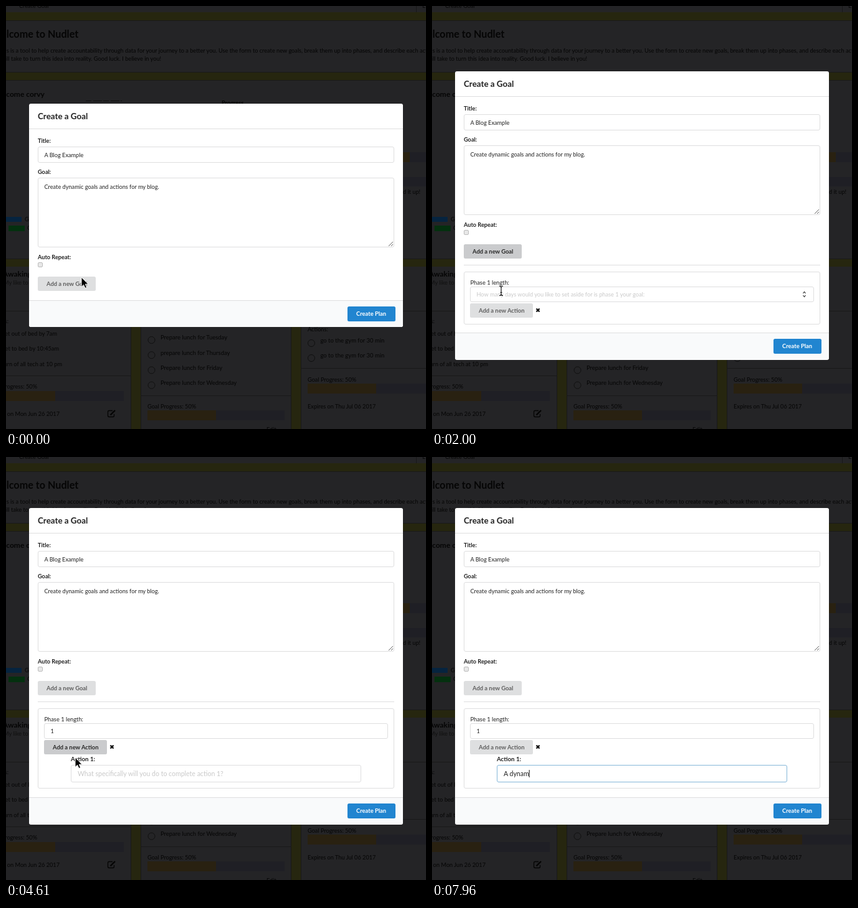
Animation, 674 px wide and 680 px high, one loop 8000 ms. Source, as an HTML page:

```html
<!DOCTYPE html>
<html lang="en">
<head>
<meta charset="utf-8">
<title>Create a Goal</title>
<style>
  html, body { margin: 0; width: 100%; height: 100%; overflow: hidden; background: #242426; }
  svg { display: block; width: 674px; height: 680px; }
  text { font-family: Lato, "Open Sans", sans-serif; white-space: pre; }
</style>
</head>
<body>
<svg id="stage" viewBox="0 0 674 680" xmlns="http://www.w3.org/2000/svg"></svg>
<script>
const LOOP = 8000;
const INK = '#212121', EDGE = '#dededf', FOCUS = '#85b7d9';
const PALE = '#c9c9c9', DIM = '#858585';
const BODY = 9.2, INPUT = 10.55;

// Text is placed by its left edge and its vertical centre.
const text = (x, cy, size, str, { bold, fill = INK, id, anchor } = {}) =>
  `<text x="${x}" y="${(cy + size * 0.36).toFixed(2)}" font-size="${size}" fill="${fill}"` +
  (bold ? ' font-weight="700"' : '') + (id ? ` id="${id}"` : '') +
  (anchor ? ` text-anchor="${anchor}"` : '') + `>${str}</text>`;

const rect = (x, y, w, h, fill, extra = '') =>
  `<rect x="${x}" y="${y}" width="${w}" height="${h}" fill="${fill}" ${extra}/>`;

const box = (x, y, w, h, id = '') =>
  rect(x + .5, y + .5, w - 1, h - 1, '#fff', `rx="2.5" stroke="${EDGE}"` + (id && ` id="${id}"`));

const path = (d, stroke, width = 1, extra = '') =>
  `<path d="${d}" fill="none" stroke="${stroke}" stroke-width="${width}" ${extra}/>`;

function pageMarkup() {
  const dark = '#050505', soft = '#101010', line = '#191919';
  const gap = '#26260f', track = '#1f1f25', done = '#292111';
  const t = (x, cy, str, o = {}) => text(x, cy, o.size || BODY, str, { fill: dark, ...o });
  const bar = (x, y, w, part) => rect(x, y, w, 16, track) + rect(x, y, part, 16, done);
  const todo = (x, cy, str) =>
    `<circle cx="${x}" cy="${cy + 4}" r="5.5" fill="none" stroke="${soft}"/>` +
    t(x + 14.5, cy, str, { size: 9.46 });
  const lunch = ['Prepare lunch for Tuesday', 'prepare lunch for Thursday',
    'Prepare lunch for Friday', 'Prepare lunch for Wednesday'];
  return [
    rect(0, 10, 674, 13, gap), rect(0, 107, 674, 12, gap), rect(0, 407, 674, 12, gap),
    rect(201, 490, 15, 190, gap), rect(458, 490, 15, 190, gap),
    path('M0 23.5H674M0 106.5H674M0 119.5H674M0 406.5H674M658.5 0V10', line),
    t(21, 0, 'Create Goal'), t(668, 0, 'E'),
    t(-24, 45, 'Welcome to Nudlet', { size: 16.2, bold: true }),
    t(-12, 72, 'This is a tool to help create accountability through data for your journey to a better you. ' +
      'Use the form to create new goals, break them up into phases, and describe each action'),
    t(249, 85, 'it will take to turn this idea into reality. Good luck. I believe in you!', { anchor: 'end' }),
    t(-21, 142, 'Welcome corvy', { size: 12, bold: true }),
    t(346, 156, 'Progress', { bold: true }),
    path('M128 152.5H186', soft, 1, 'stroke-dasharray="9 3 14 2"'),
    bar(637, 235, 37, 11), rect(637, 275, 37, 15, track),
    t(665, 299, 'Speed it up!', { anchor: 'end' }),
    rect(0, 339, 25, 8, '#06243f'), rect(4, 353, 26, 9, '#04300f'),
    t(30, 343, 'Goals'), t(34, 357, 'Goals'),
    t(-5, 431, 'Awaking early', { size: 12, bold: true }), t(-4, 445, 'My like to get up', { fill: soft }),
    // left card
    path('M0 490.5H200.5V680M0 594.5H200', line),
    t(4, 507, 'Actions:', { anchor: 'end' }),
    t(82, 527, 'get out of bed by 7am', { anchor: 'end' }),
    t(85, 551, 'get to bed by 10:45am', { anchor: 'end' }),
    t(90, 576, 'turn of all tech at 10 pm', { anchor: 'end' }),
    t(50, 612, 'Goal Progress: 50%', { anchor: 'end' }), bar(0, 619, 189, 79),
    t(86, 656, 'Expires on Mon Jun 26 2017', { anchor: 'end' }),
    path('M171 650.5H165.5Q163.5 650.5 163.5 652.5V658.5Q163.5 660.5 165.5 660.5H171.5Q173.5 660.5 173.5 658.5V656', dark, 1.3),
    path('M167.5 657.5L175 650', dark, 2.4),
    // middle card
    path('M216.5 680V490.5H457.5V680M217 626.5H457', line),
    ...lunch.map((s, i) => todo(233.5, 533 + i * 24.2, s)),
    t(227, 644, 'Goal Progress: 50%'), bar(227, 650, 220, 110),
    t(418, 681, 'Edit'),
    // right card
    path('M473.5 680V490.5H674M474 582.5H674', line),
    t(484, 520, 'Actions:'),
    todo(490, 538, 'go to the gym for 30 min'), todo(490, 562, 'go to the gym for 30 min'),
    t(484, 601, 'Goal Progress: 50%'), bar(484, 607, 190, 110),
    t(484, 644, 'Expires on Thu Jul 06 2017')
  ].join('');
}

const button = (id, x, y, w, label) =>
  `<g id="${id}">${rect(x, y, w, 23, '#e0e1e2', 'rx="2.5"')}` +
  text(x + 14, y + 11.5, 9.4, label, { bold: true }) + '</g>';

function modalMarkup() {
  return `<g id="modal">
    <rect id="sheet" x="37" width="600" rx="3" fill="#fff"/>
    ${text(51, 20, 13.4, 'Create a Goal', { bold: true })}
    ${path('M37 40.5H637', EDGE)}
    ${text(51, 60, 9.2, 'Title:', { bold: true })}${box(51, 69, 572, 26)}
    ${text(61.5, 82.5, BODY, 'A Blog Example')}
    ${text(51, 110, 9.2, 'Goal:', { bold: true })}${box(51, 119, 572, 112)}
    ${text(61.5, 133.5, BODY, 'Create dynamic goals and actions for my blog.')}
    ${path('M614 229L621 222M618 229L621 226', '#555', .9)}
    ${text(51, 246.5, 9.2, 'Auto Repeat:', { bold: true })}
    ${rect(51.5, 255.5, 7, 7, '#e8e8e8', 'rx="1.5" stroke="#bcbcbc"')}
    ${button('addGoal', 51, 278, 93, 'Add a new Goal')}
    <g id="phase">
      ${path('M51 311.5H623', EDGE)}
      <rect id="phaseBox" x="51.5" y="322.5" width="571" rx="2.5" fill="#fff" stroke="${EDGE}"/>
      ${text(61.5, 339.5, 9.3, 'Phase 1 length:')}${box(61, 346, 552, 25, 'daysBox')}
      ${text(71.5, 358.5, BODY, '', { id: 'days' })}
      <g id="spin">${path('M595.5 357L597.5 354.5L599.5 357M595.5 360L597.5 362.5L599.5 360', '#333', 1.2)}</g>
      ${button('addAction', 61, 373, 101, 'Add a new Action')}
      ${path('M167.5 381.5L172.5 386.5M172.5 381.5L167.5 386.5', '#111', 2.3)}
    </g>
    <g id="action">
      ${text(104, 403.5, 9.7, 'Action 1:', { bold: true })}${box(104, 413, 466, 28, 'stepBox')}
      ${text(115, 427, INPUT, '', { id: 'step' })}
    </g>
    <rect id="caret" width="1" fill="#111"/>
    <g id="foot">
      <path d="M37 0H637V40Q637 43 634 43H40Q37 43 37 40Z" fill="#f9fafb"/>
      ${path('M37 .5H637', EDGE)}
      ${rect(548, 10, 77, 24, '#2185d0', 'rx="2.5"')}
      ${text(562, 22, 9.4, 'Create Plan', { bold: true, fill: '#fff' })}
    </g></g>`;
}

// Each pointer has its hot spot at the origin.
const pointers = `
  <g id="arrow"><path d="M0 0V15.5L3.6 12.2L6 17.5L8.6 16.4L6.3 11.2H11Z"
    fill="#000" stroke="#fff" stroke-width="1" stroke-linejoin="round"/></g>
  <g id="beam">${path('M-3 -7.5Q0 -7.5 0 -5.5Q0 -7.5 3 -7.5M0 -5.5V5.5M-3 7.5Q0 7.5 0 5.5Q0 7.5 3 7.5M-1.5 2.5H1.5', '#111', 1.2)}</g>
  <g id="hand"><path d="M-1.5 9V1Q-1.5 -.5 0 -.5Q1.5 -.5 1.5 1V6Q1.5 4.7 2.9 4.7Q4.2 4.7 4.2 6.3Q4.4 5.3 5.6 5.4Q6.8 5.6 6.8 7Q7.2 6.3 8.1 6.5Q9 6.8 9 8V11Q9 13 7.5 15V17H0V15Q-2 12.5 -4.6 9.3Q-5.2 7.8 -4 7.3Q-2.8 7.2 -1.5 9Z"
    fill="#fff" stroke="#000" stroke-width="1.1" stroke-linejoin="round"/>
    ${path('M2 10V14M4.3 10V14M6.5 10V14', '#000', .8)}</g>`;

const stage = document.getElementById('stage');
stage.innerHTML = rect(0, 0, 674, 680, '#242426') + pageMarkup() + modalMarkup() + pointers;
const $ = id => document.getElementById(id);
const set = (id, attrs) => { for (const k in attrs) $(id).setAttribute(k, attrs[k]); };
const show = (id, on) => set(id, { visibility: on ? 'visible' : 'hidden' });

// Modal states: start, top, sheet height, footer offset, phase box height.
const layouts = [
  [0, 157, 359, 316, 0],
  [1480, 105, 464, 420, 84],
  [4420, 82, 509, 465, 128]
];
const FOCUS_DAYS = 2400, TYPE_DAYS = 3350, FOCUS_STEP = 5300;
const keys = [6250, 6500, 6880, 7150, 7480, 7700, 7880];
const phrase = 'A dynam';

// Pointer path: time, x, y, kind from that time on.
const moves = [
  [0, 121, 436, 'arrow'], [620, 121, 436, 'arrow'], [760, 114, 444, 'hand'],
  [1480, 114, 444, 'beam'], [1650, 114, 452, 'beam'], [1850, 111, 458, 'beam'],
  [3770, 111, 458, 'beam'], [3940, 111, 477, 'arrow'], [4030, 111, 483, 'arrow'],
  [4240, 111, 483, 'hand'], [4420, 111, 483, 'arrow'], [4850, 111, 483, 'arrow'],
  [5000, 126, 495, 'beam'], [5110, 133, 499, 'beam'], [6250, 133, 499, 'none']
];
// Button darkness over time.
const goalTone = [[0, 0], [640, 0], [760, .45], [1380, .45], [1480, 1], [FOCUS_DAYS, 1], [2500, 0]];
const actionTone = [[0, 0], [4020, 0], [4120, 1], [FOCUS_STEP, 1], [5400, 0]];

const last = (rows, t) => rows.filter(r => r[0] <= t).pop();

function at(rows, t, col = 1) {
  const a = last(rows, t), b = rows[rows.indexOf(a) + 1];
  return b ? a[col] + (b[col] - a[col]) * (t - a[0]) / (b[0] - a[0]) : a[col];
}

const mix = (a, b, k) => `rgb(${a.map((v, i) => Math.round(v + (b[i] - v) * k))})`;

function tint(id, k) {
  const [face, label] = $(id).children;
  face.setAttribute('fill', mix([222, 223, 224], [202, 203, 205], k));
  label.setAttribute('fill', mix([96, 96, 96], [42, 42, 42], k));
}

function fillField(id, value, hint, focused) {
  $(id).textContent = value || hint;
  set(id, { fill: value ? INK : focused ? DIM : PALE });
  set(id + 'Box', { stroke: focused ? FOCUS : EDGE });
}

function render(t) {
  const [, top, height, foot, phase] = last(layouts, t);
  set('modal', { transform: `translate(0 ${top})` });
  set('sheet', { height });
  set('foot', { transform: `translate(0 ${foot})` });
  set('phaseBox', { height: phase });
  const hasAction = phase > 100;
  show('phase', phase > 0);
  show('action', hasAction);
  show('spin', phase > 0 && !hasAction);

  const typed = phrase.slice(0, keys.filter(k => k <= t).length);
  fillField('days', t >= TYPE_DAYS ? '1' : '',
    'How many days would you like to set aside for is phase 1 your goal:', t >= FOCUS_DAYS && t < 4420);
  fillField('step', typed, 'What specifically will you do to complete action 1?', t >= FOCUS_STEP);

  const inStep = t >= FOCUS_STEP;
  const input = [FOCUS_DAYS, TYPE_DAYS, FOCUS_STEP, ...keys].filter(k => k <= t).pop();
  const blinkOn = (t - input) % 1000 < 500;
  show('caret', blinkOn && (inStep || t < 4420));
  const width = inStep ? (typed ? $('step').getComputedTextLength() : 0)
    : t >= TYPE_DAYS ? $('days').getComputedTextLength() : 0;
  set('caret', inStep ? { x: 115 + width, y: 421, height: 12 } : { x: 71 + width, y: 353, height: 11 });

  tint('addGoal', at(goalTone, t));
  tint('addAction', at(actionTone, t));

  const kind = last(moves, t)[3];
  for (const id of ['arrow', 'beam', 'hand']) {
    show(id, id === kind);
    set(id, { transform: `translate(${at(moves, t, 1)} ${at(moves, t, 2)})` });
  }
}

const start = performance.now();
function tick() {
  render((performance.now() - start) % LOOP);
  requestAnimationFrame(tick);
}
tick();
</script>
</body>
</html>
```
